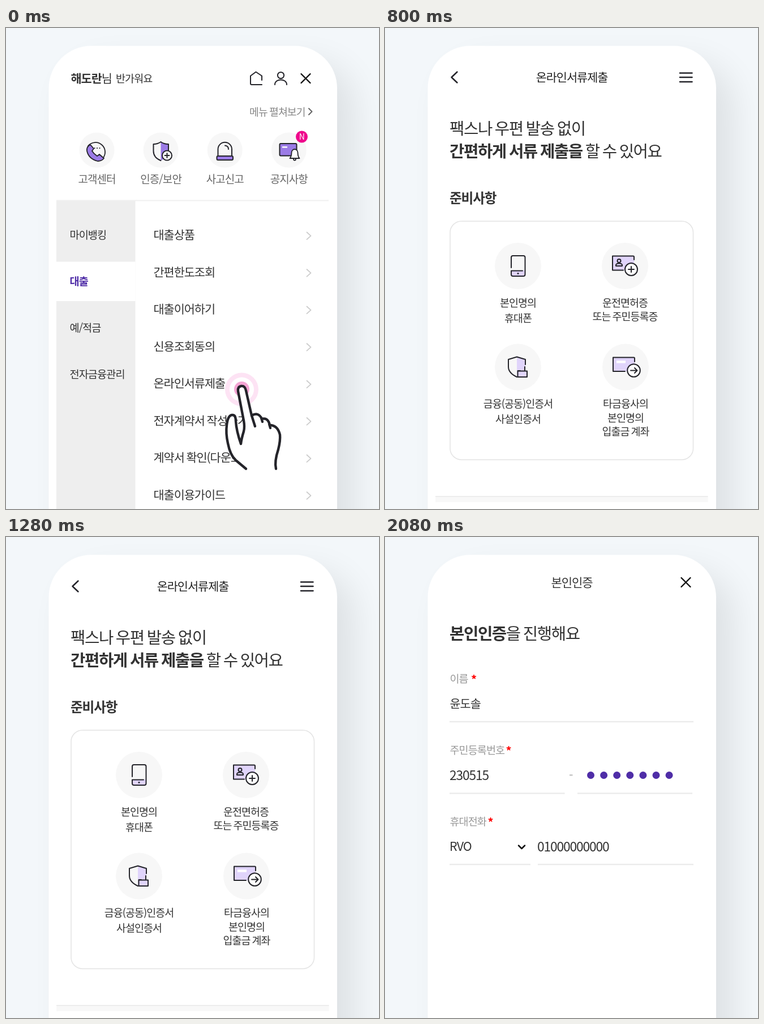
Recreate the animation shown at these times as an HTML page with a canvas. Size 659 by 849 pixels, loop 2.4 s.

```html
<!DOCTYPE html>
<html lang="ko">
<head>
<meta charset="utf-8">
<title>온라인서류제출 안내</title>
<style>
html, body { margin: 0; width: 100%; height: 100%; overflow: hidden; background: #f3f7fa; }
canvas { display: block; }
</style>
</head>
<body>
<canvas id="stage" width="659" height="849"></canvas>
<script>
const ctx = document.getElementById('stage').getContext('2d');
const FONT = '"Noto Sans CJK KR", "Noto Sans KR", "Noto Sans CJK JP", "Noto Sans CJK", sans-serif';
const INK = '#24242a', TEXT = '#333', VIOLET = '#9b7be6', LILAC = '#e0d4fb', DEEP = '#4f2da7';
const SCENE_MS = 800;

// y is the vertical middle of the glyphs; returns the x where the text ends
function text(str, x, y, size, { weight = 400, color = TEXT, align = 'left' } = {}) {
  ctx.font = `${weight} ${size}px ${FONT}`;
  ctx.letterSpacing = `${-0.05 * size}px`;
  ctx.textAlign = align;
  ctx.fillStyle = color;
  ctx.fillText(str, x, y + size * 0.37);
  return x + ctx.measureText(str).width;
}

const centered = (str, x, y, size, opts) => text(str, x, y, size, { ...opts, align: 'center' });

function shape(d, { fill, stroke, width = 2 } = {}) {
  const path = typeof d === 'string' ? new Path2D(d) : d;
  if (fill) {
    ctx.fillStyle = fill;
    ctx.fill(path);
  }
  if (stroke) {
    ctx.strokeStyle = stroke;
    ctx.lineWidth = width;
    ctx.stroke(path);
  }
}

const line = (d, width = 2, color = INK) => shape(d, { stroke: color, width });

function circle(x, y, r, style) {
  const path = new Path2D();
  path.arc(x, y, r, 0, Math.PI * 2);
  shape(path, style);
}

function box(x, y, w, h, r, style) {
  const path = new Path2D();
  path.roundRect(x, y, w, h, r);
  shape(path, style);
}

function rect(x, y, w, h, color) {
  ctx.fillStyle = color;
  ctx.fillRect(x, y, w, h);
}

const cross = (x, y, r) => line(`M${x - r} ${y - r}l${2 * r} ${2 * r}m0 ${-2 * r}l${-2 * r} ${2 * r}`, 2.4, '#111');
const plus = (x, y, r) => line(`M${x - r} ${y}h${2 * r}M${x} ${y - r}v${2 * r}`);

function phone() {
  rect(0, 0, 659, 849, '#f3f7fa');
  ctx.save();
  ctx.shadowColor = 'rgba(0,0,0,.09)';
  ctx.shadowBlur = 60;
  ctx.shadowOffsetX = ctx.shadowOffsetY = 30;
  box(75.5, 31.5, 509.5, 1000, 75, { fill: '#fff' });
  ctx.restore();
}

function headerIcons() {
  line('M452 92V84.5L441.500 77.500L432 84.500V98Q432 100 434 100H452', 2);
  circle(485.5, 83.5, 5.6, { stroke: INK });
  line('M475 100C475 88.500 496 88.500 496 100', 2);
  cross(529.5, 89, 8);
}

function callIcon() {
  line('M145 208A17 17 0 1 1 171 230', 1.8);
  for (const x of [156.5, 161, 165.5]) circle(x, 212, 1.1, { fill: INK });
  shape('M147 207Q142 211 143 217Q146 231 162 235Q169 235 173 230L165 223L161 226Q155 222 152 217L155 213L150 207Q148 206 147 207Z',
    { fill: VIOLET, stroke: INK, width: 1.8 });
}

function securityIcon() {
  shape('M273.500 201Q279 205 287 205V217Q286 229 273.500 234Z', { fill: VIOLET });
  line('M273.500 234Q260.500 229 260.500 217V205Q268 205 273.500 201Q279 205 287 205V216');
  circle(284.5, 225, 8.5, { fill: '#fff', stroke: INK });
  plus(284.5, 225, 4);
}

function sirenIcon() {
  line('M374.500 226V214A12.200 12.200 0 0 1 399 214V226M387 207.500Q393 208 393 214');
  box(372.500, 226, 28.500, 7, 2, { fill: VIOLET, stroke: INK });
}

function noticeIcon() {
  box(483.500, 204, 30, 21.500, 2, { fill: VIOLET, stroke: INK });
  rect(488, 209, 9, 2.500, '#fff');
  circle(510, 231.500, 2, { fill: '#fff', stroke: INK, width: 1.8 });
  shape('M501.500 230Q504.500 227 504.500 220A5.500 6 0 0 1 515.500 220Q515.500 227 518.500 230Z',
    { fill: '#fff', stroke: INK, width: 1.8 });
  circle(522.5, 192, 10.5, { fill: '#ef078c' });
  centered('N', 522.5, 192, 14, { color: '#fff' });
}

function hand() {
  circle(416.5, 638, 29.5, { fill: '#fde3f4' });
  circle(416.5, 638, 21.5, { fill: '#fff' });
  circle(416.5, 637.5, 13.5, { fill: '#f3a5d3' });
  const left = 'M424 778L406 763Q396 754 392 733Q388 715 390 701Q392 683 400 683Q406 683 406 694Q407 711 415 734';
  const finger = 'Q416 725 420 712Q422 704 420 693L410 641Q409 633 415.500 632Q422 631 424 640L434 684';
  const right = 'Q446 677 452 690Q463 687 466 701Q480 701 484 718Q485 728 481 744Q474 765 477 778';
  shape(left + finger + right + 'Z', { fill: '#fff' });
  line(left + finger + right, 4.4);
  line('M434 684L440 703M451 688L453 695M465 699L467 706', 4.4);
}

function menuScene() {
  const nameEnd = text('해도란', 114.5, 89, 20.8, { weight: 700 });
  text('님', nameEnd, 89, 20.8);
  text('반가워요', 194, 89.5, 18.5);
  headerIcons();
  text('메뉴 펼쳐보기', 430, 148, 18.3, { color: '#888' });
  line('M535 142l5.500 5.500l-5.500 5.500', 2, '#666');

  ['고객센터', '인증/보안', '사고신고', '공지사항'].forEach((label, i) => {
    const x = 160.5 + 113.1 * i;
    circle(x, 215.5, 31, { fill: '#f7f7f7' });
    centered(label, x, 267, 19, { color: '#666' });
  });
  callIcon();
  securityIcon();
  sirenIcon();
  noticeIcon();

  rect(89, 303.5, 481, 2, '#f0f0f0');
  rect(89, 305, 139.5, 544, '#eee');
  rect(89, 412.5, 139.5, 69.5, '#fff');
  ['마이뱅킹', '대출', '예/적금', '전자금융관리'].forEach((label, i) => {
    const active = i === 1;
    text(label, 112.5, 365 + 82 * i, 18.6, active ? { weight: 700, color: DEEP } : {});
  });

  const items = ['대출상품', '간편한도조회', '대출이어하기', '신용조회동의', '온라인서류제출',
    '전자계약서 작성하기', '계약서 확인(다운로드)', '대출이용가이드'];
  items.forEach((label, i) => {
    const y = 365.5 + 65.5 * i;
    text(label, 260.5, y, 20.8);
    line(`M531.500 ${y - 5}l7 6.300l-7 6.300`, 1.8, '#ccc');
  });
  hand();
}

function mobileIcon() {
  shape('M223 428H247V438H223Z', { fill: LILAC });
  line('M223 423V405Q223 402 226 402H244.500Q247.500 402 247.500 405V435Q247.500 438 244.500 438H226Q223 438 223 435V428.500H243');
  circle(235, 433.3, 1.5, { fill: INK });
}

function licenseIcon() {
  box(402, 402.5, 38, 25, 1, { fill: LILAC });
  line('M440 409V404Q440 402.500 438.500 402.500H402V427.500H421');
  circle(413.5, 411, 3, { stroke: INK });
  line('M408 420V418Q409 415.500 413.500 415.500Q418 415.500 419 418V420Z');
  circle(435, 426, 11, { fill: '#fff', stroke: INK });
  plus(435, 426, 5);
}

function certificateIcon() {
  shape('M233 580.500L248 585V601Q247 611 233 616Z', { fill: LILAC });
  line('M233 616Q218 609 218 598V585L233 580.500L248 585V594');
  shape('M234.500 616V605H239M234.500 605.500H251V616H234.500Z', { fill: LILAC, stroke: INK });
  line('M247 598V605');
}

function accountIcon() {
  box(403, 581.5, 38, 24.5, 1, { fill: LILAC });
  line('M441 589V583Q441 581.500 439.500 581.500H403V606H424');
  rect(409, 587, 16, 4.5, '#fff');
  circle(439.5, 604.5, 11.3, { fill: '#fff', stroke: INK });
  line('M434 604.500H445M441 600l4.500 4.500l-4.500 4.500');
}

function prepareScene() {
  line('M127.500 77.500L117.500 87L127.500 96.500', 2.5);
  centered('온라인서류제출', 330, 87, 20.8, { weight: 500, color: '#222' });
  line('M521 79.500H542.500M521 87H542.500M521 95H542.500', 2.5);

  text('팩스나 우편 발송 없이', 114, 177, 28.7);
  const boldEnd = text('간편하게 서류 제출을', 114, 217, 28.7, { weight: 700 });
  text(' 할 수 있어요', boldEnd, 217, 28.7);
  text('준비사항', 114, 300, 23.7, { weight: 700 });

  box(115, 341, 429.5, 421, 20, { stroke: '#e4e4e4', width: 1.5 });
  const cards = [
    [235, 420, ['본인명의', '휴대폰'], 27],
    [424, 420, ['운전면허증', '또는 주민등록증'], 24.5],
    [235, 598.5, ['금융(공동)인증서', '사설인증서'], 27],
    [425, 598.5, ['타금융사의', '본인명의', '입출금 계좌'], 24.5]
  ];
  for (const [x, y, lines, gap] of cards) {
    circle(x, y, 41, { fill: '#f7f7f7' });
    lines.forEach((label, i) => centered(label, x, y + 65 + gap * i, 18.4));
  }
  mobileIcon();
  licenseIcon();
  certificateIcon();
  accountIcon();

  rect(89, 826, 481.5, 11, '#f8f8f8');
  rect(89, 826, 481.5, 1.5, '#eaeaea');
}

function field(label, y, starX) {
  text(label, 114.5, y, 18.5, { color: '#999' });
  centered('*', starX, y + 2, 20, { weight: 700, color: '#f00' });
}

const underline = (x1, x2, y) => rect(x1, y - 1.2, x2 - x1, 2.4, '#ebebeb');

function verifyScene() {
  centered('본인인증', 330, 80, 21, { weight: 500 });
  cross(531.5, 80, 8);
  const boldEnd = text('본인인증', 114, 170, 28.7, { weight: 700 });
  text('을 진행해요', boldEnd, 170, 28.7);

  field('이름', 250, 156.5);
  text('윤도솔', 114.5, 294, 20.8);
  underline(114, 545, 326);

  field('주민등록번호', 376, 218);
  text('230515', 114, 420.5, 22.8);
  rect(326, 419.3, 5.5, 2, '#bbb');
  for (let i = 0; i < 7; i++) circle(363.5 + 23.1 * i, 420.5, 6.5, { fill: DEEP });
  underline(114, 317.5, 452.5);
  underline(340, 543, 452.5);

  field('휴대전화', 502, 186);
  text('RVO', 114, 546.5, 21.5);
  line('M236 544.500l5.500 5.500l5.500 -5.500', 2.5, '#111');
  text('01000000000', 269, 546.5, 22.8);
  underline(114, 257, 578);
  underline(270, 545, 578);
}

const scenes = [menuScene, prepareScene, verifyScene];
ctx.lineCap = ctx.lineJoin = 'round';

function draw() {
  const index = Math.floor(performance.now() / SCENE_MS) % scenes.length;
  phone();
  scenes[index]();
  requestAnimationFrame(draw);
}
draw();
</script>
</body>
</html>
```
